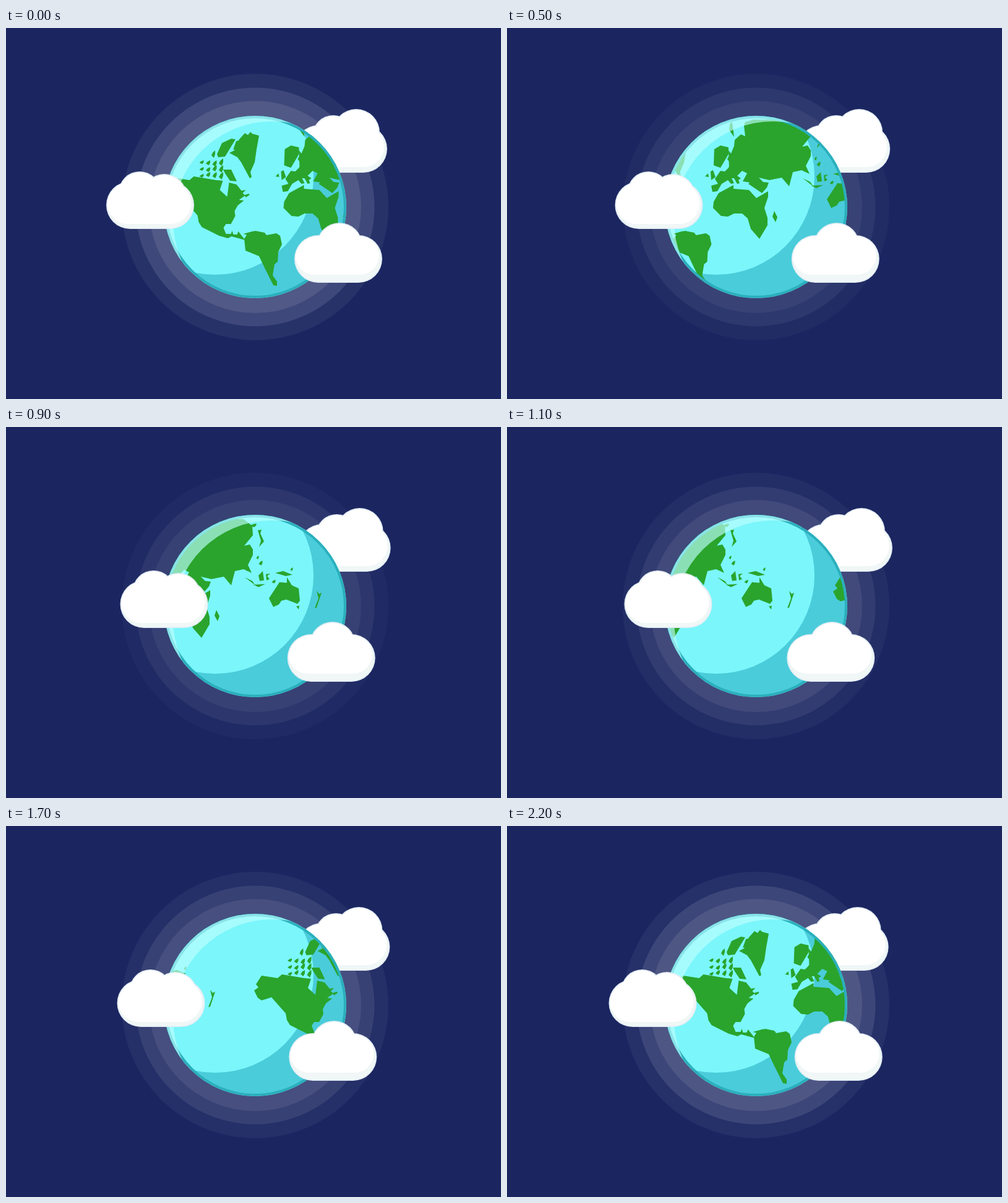
Recreate the animation shown at these times as an HTML page with a canvas. Size 800x600 px, loop 2.3 s.

```html
<!DOCTYPE html>
<html lang="en">
<head>
<meta charset="utf-8">
<title>Spinning globe</title>
<style>
  html, body { margin: 0; width: 100%; height: 100%; overflow: hidden; background: #1b2661; }
  canvas { display: block; }
</style>
</head>
<body>
<canvas id="stage" width="800" height="600"></canvas>
<script>
const ctx = document.getElementById('stage').getContext('2d');
const LOOP = 2300, STEP = 100, MAP_WIDTH = 522;
const CX = 402.5, CY = 289.5, R = 147.5;

// time, map travel, glow of outer / middle / inner ring
const KEYS = [
  [0, 0, .053, .158, .237],
  [300, 69.5, .04, .105, .18],
  [700, 161.5, .013, .057, .079],
  [1100, 253.5, .035, .1, .167],
  [1500, 338.5, .044, .123, .197],
  [1900, 420.5, .04, .123, .184],
  [2200, 508, .048, .149, .224],
  [LOOP, MAP_WIDTH, .053, .158, .237]
];

const land = new Path2D();

function shape(dx, ...pts) {
  for (let i = 0; i < pts.length; i += 2) {
    land[i ? 'lineTo' : 'moveTo'](pts[i] + dx, pts[i + 1]);
  }
  land.closePath();
}

function islet(x, y, w, h) {
  shape(0, x - w, y + h / 3, x - w / 5, y - h / 2, x + w, y - h, x + w, y, x + w / 3, y + h);
}

// North America
shape(-101.5,
  360,266, 367,261, 363,256, 372,242, 398,246, 405,240, 441,246, 452,247, 447,262, 459,273,
  462,250, 474,253, 482,263, 489,262, 484,267, 488,271, 478,278, 486,279, 476,287, 471,296,
  472,304, 465,317, 457,317, 453,323, 457,333, 465,333, 467,328, 469,334, 475,334, 477,329,
  488,343, 466,337, 460,340, 446,336, 418,322, 413,314, 411,303, 388,277, 379,280, 372,282,
  366,278);
shape(-101.5, 487,270, 494,268, 495,270, 489,274);
shape(-101.5, 485,333, 503,328, 492,335);

// Arctic islands
shape(0, 341,204, 349,186, 364,179, 371,180, 354,208, 343,209);
shape(0, 367,197, 372,183, 382,180, 373,195);
shape(0, 351,229, 364,229, 373,248, 362,247, 354,235);
for (let i = 0; i < 12; i++) {
  islet(316 + i % 4 * 10.5, 217 + Math.floor(i / 4) * 10 + i % 3, 3.5, 3 + i % 4);
}
islet(335, 204, 3, 6);

// Greenland
shape(0,
  386,170, 391,173, 395,168, 398,171, 409,174, 405,196, 402,217, 395,233, 397,241, 394,243,
  380,217, 374,209, 361,202, 369,198, 377,180);

// South America
shape(0,
  385,341, 390,333, 403,328, 418,331, 421,335, 437,332, 443,336, 446,350, 440,362, 439,378,
  434,382, 431,400, 438,410, 438,417, 432,416, 418,388, 409,369, 387,360);

// Asia
shape(69.5,
  404,198, 408,203, 413,191, 414,181, 424,172, 431,175, 429,158, 431,152, 445,148, 522,149,
  536,160, 537,175, 523,192, 532,190, 537,198, 537,207, 529,223, 535,236, 522,230, 508,233,
  502,256, 490,242, 470,246, 453,242, 440,250, 427,248, 434,235, 426,231, 405,228);

// Arabia
shape(69.5, 440,248, 453,242, 460,249, 469,250, 466,258, 458,267, 436,252);

// Europe
shape(69.5,
  405,206, 426,231, 418,239, 424,243, 420,246, 422,251, 418,252, 413,243, 409,243, 413,251,
  408,252, 403,246, 393,252, 386,264, 378,265, 376,255, 387,252, 382,244, 391,231, 398,232,
  404,226, 407,219, 402,212);
shape(69.5,
  380,222, 381,196, 391,190, 404,193, 404,204, 391,226, 385,224);
shape(69.5, 405,165, 406,155, 410,152, 413,176);
shape(69.5, 375,232, 379,230, 383,241, 376,246);
shape(69.5, 366,240, 371,235, 372,241);

// Africa
shape(69.5,
  379,291, 380,281, 388,267, 412,254, 412,260, 437,262, 449,275, 468,264, 468,273, 462,291,
  467,307, 467,319, 454,341, 440,325, 435,308, 426,300, 413,300, 403,305, 392,304);
shape(69.5, 475,305, 478,296, 483,306, 480,314);

// East Asian islands
shape(253.5, 361,167, 367,166, 365,172, 371,185, 363,194, 366,184);
shape(253.5, 340,243, 352,249, 357,256);
shape(253.5, 354,255, 373,254, 362,259);
shape(253.5, 362,240, 369,233, 371,248, 364,249);
shape(253.5, 374,238, 381,237, 376,241, 380,246, 375,248);
shape(253.5, 389,236, 402,233, 417,239, 406,241);
islet(607, 159, 5, 3);
islet(614, 211, 2, 3);
islet(619, 220, 3, 4);
islet(640, 250, 3, 3);
islet(669, 230, 2, 3);

// Australia and New Zealand
shape(253.5,
  379,277, 396,251, 408,252, 408,243, 416,256, 427,261, 429,281, 425,286, 407,279, 399,281,
  395,287, 386,291);
shape(253.5, 423,290, 428,289, 427,295);
shape(253.5, 456,265, 460,270, 464,268, 456,292, 453,293, 459,277);

const disc = (x, y, r) => {
  const p = new Path2D();
  p.arc(x, y, r, 0, Math.PI * 2);
  return p;
};

const GLOBE = disc(CX, CY, R);
const LIT = disc(338, 240, 159);
const GLARE = disc(CX, CY, R);
GLARE.addPath(disc(430, 311, 160));
const RINGS = [215.5, 193, 171.5].map(r => disc(CX, CY, r));

// Pill box, depth of the lower shade, and round bumps [x, y, r]
const CLOUDS = {
  back: { x: 467, y: 157, w: 149, h: 77, lip: 9, bumps: [[529, 175, 34], [566, 169, 38]] },
  left: { x: 162, y: 248, w: 142, h: 77, lip: 8, bumps: [[216, 266, 34], [256, 272, 36]] },
  front: { x: 466, y: 335, w: 142, h: 77, lip: 13, bumps: [[539, 352, 37]] }
};

function puff(c, inset, right, bottom) {
  const p = new Path2D();
  const h = c.h - inset - bottom;
  p.roundRect(c.x + inset, c.y + inset, c.w - inset - right, h, h / 2);
  for (const [x, y, r] of c.bumps) p.addPath(disc(x, y, r - inset));
  return p;
}

for (const c of Object.values(CLOUDS)) {
  c.edge = puff(c, 0, 0, 0);
  c.body = puff(c, 1.8, 1.8, 1.8);
  c.top = puff(c, 1.8, 5, c.lip);
}

function fill(path, color, rule) {
  ctx.fillStyle = color;
  ctx.fill(path, rule || 'nonzero');
}

function drawCloud(c, dx) {
  ctx.save();
  ctx.translate(dx, 0);
  fill(c.edge, '#e5eef5');
  fill(c.body, '#f0f7f6');
  ctx.clip(c.body);
  fill(c.top, '#ffffff');
  ctx.restore();
}

function drawGlobe(travel) {
  ctx.save();
  ctx.clip(GLOBE);
  fill(GLOBE, '#4accda');
  fill(LIT, '#7bf6fb');
  for (const dx of [-travel, MAP_WIDTH - travel]) {
    ctx.save();
    ctx.translate(dx, 0);
    fill(land, '#2aa42c');
    ctx.restore();
  }
  ctx.strokeStyle = '#2aafbd';
  ctx.lineWidth = 8;
  ctx.stroke(GLOBE);
  fill(GLARE, 'rgba(190,255,255,.65)', 'evenodd');
  ctx.restore();
}

function pose(t) {
  const i = KEYS.findIndex(k => k[0] > t);
  const a = KEYS[i - 1], b = KEYS[i];
  const f = (t - a[0]) / (b[0] - a[0]);
  return a.map((v, n) => v + (b[n] - v) * f);
}

// Clouds drift 2.5 px a step, out and back; the last stretch catches up one step
function driftAt(t) {
  const late = Math.min(1, Math.max(0, (t - 1900) / 300));
  return 30 - Math.abs(t / 40 + late * 2.5 - 30);
}

function glow(a) {
  const mix = v => Math.round(v + (255 - v) * a);
  return `rgb(${mix(27)},${mix(38)},${mix(97)})`;
}

function draw(t) {
  const [, travel, ...light] = pose(t);
  const drift = driftAt(t);
  ctx.fillStyle = '#1b2661';
  ctx.fillRect(0, 0, 800, 600);
  RINGS.forEach((ring, i) => fill(ring, glow(light[i])));
  drawCloud(CLOUDS.back, drift / 4);
  drawGlobe(travel);
  drawCloud(CLOUDS.left, drift);
  drawCloud(CLOUDS.front, -drift / 2);
}

const start = performance.now();
function tick() {
  const t = (performance.now() - start) % LOOP;
  draw(Math.floor(t / STEP) * STEP);
  requestAnimationFrame(tick);
}
tick();
</script>
</body>
</html>
```
